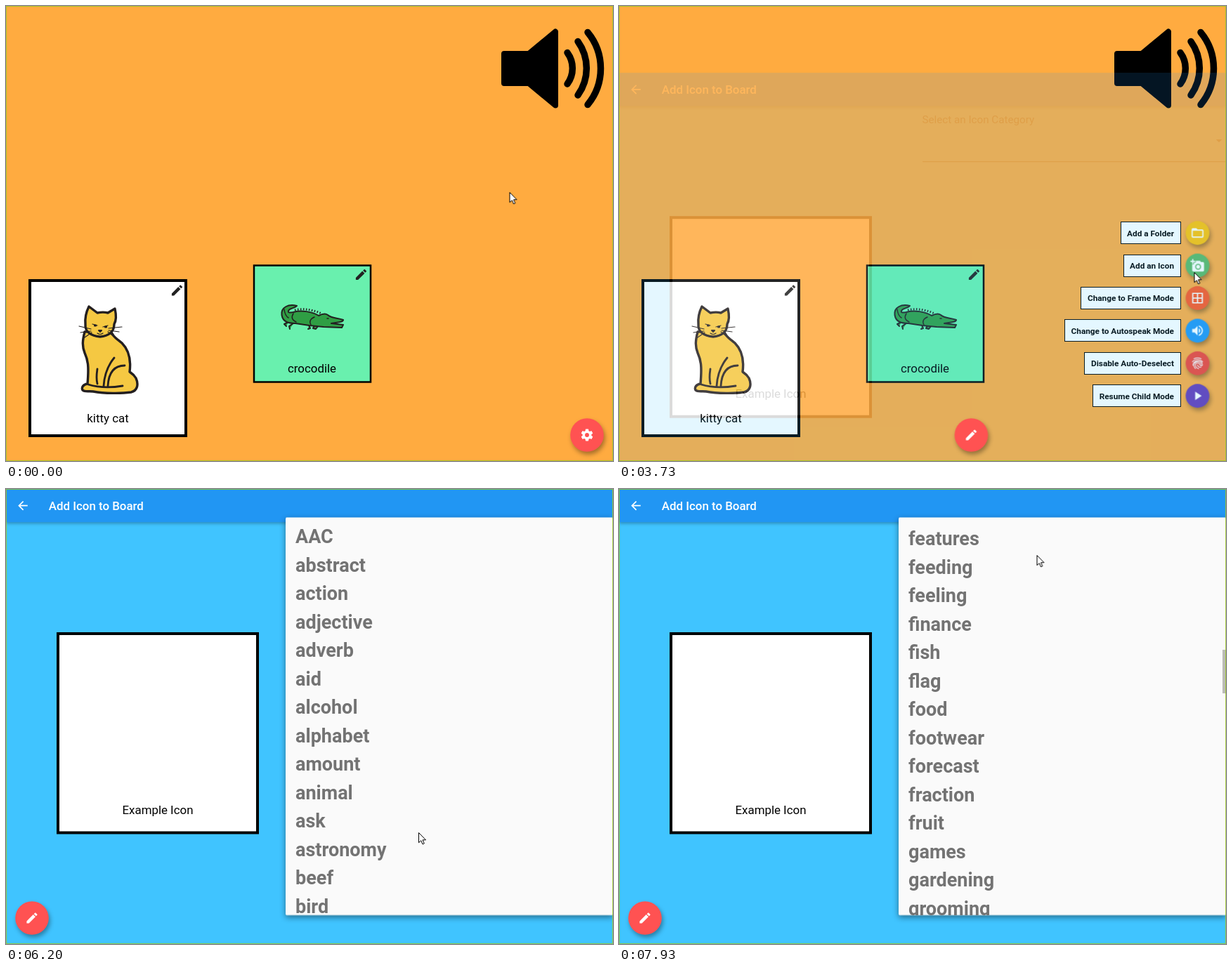
An HTML page for the animation above (8 s loop, 864 px wide and 648 px high).

```html
<!DOCTYPE html>
<html lang="en">
<head>
<meta charset="utf-8">
<title>Icon board</title>
<style>
html, body { margin: 0; width: 100%; height: 100%; overflow: hidden; background: #ffab40; }
svg { display: block; width: 864px; height: 648px; font-family: Roboto, sans-serif; font-size: 16.875px; }
.mid { text-anchor: middle; }
.label { font-size: 11.81px; font-weight: 700; text-anchor: end; }
.words { font-size: 27px; font-weight: 700; fill: #737373; }
.fab { filter: drop-shadow(2px 4px 3px rgba(0, 0, 0, .35)); }
.ink { fill: none; stroke: #231f20; stroke-linecap: round; stroke-linejoin: round; }

.cursor, .page, .hero, .gear, .press, .pick, .child, .tag, .sheet, .words, .scroll, .thumb, .bar {
  animation: 8s linear infinite both;
}
.cursor { animation-name: cursor; }
.page { animation-name: rise, fade; }
.hero { animation-name: hero, show; }
.gear { animation-name: leave; }
.press { animation-name: press; }
.pick { animation-name: pick; }
.child { animation-name: pop; }
.tag { animation-name: tag; }
.sheet { animation-name: unfold, sheet; }
.words { animation-name: words; }
.scroll { animation-name: scroll; }
.thumb { animation-name: thumb; }
.bar { animation-name: bar; }

@keyframes cursor {
  0%, 2.49% { transform: translate(716.5px, 265px); }
  2.5%, 5% { transform: translate(717.5px, 267px); animation-timing-function: ease-in-out; }
  15.83%, 23% { transform: translate(818px, 605.5px); animation-timing-function: ease-in; }
  29.17% { transform: translate(804px, 512px); }
  31.67% { transform: translate(798.5px, 487px); }
  34.17% { transform: translate(808.5px, 465px); animation-timing-function: ease-out; }
  40% { transform: translate(818.5px, 388px); }
  41.66%, 51.7% { transform: translate(818.5px, 379px); animation-timing-function: ease-in-out; }
  62.5%, 63.3% { transform: translate(583.5px, 116px); }
  63.33%, 70% { transform: translate(583px, 116px); animation-timing-function: ease-in-out; }
  77.5%, 78% { transform: translate(587px, 489px); animation-timing-function: ease-out; }
  80% { transform: translate(589px, 262px); }
  85% { transform: translate(590.5px, 234px); }
  99.12%, to { transform: translate(594.5px, 94px); }
}
@keyframes rise {
  0%, 45.48% { transform: translateY(162px); animation-timing-function: cubic-bezier(.4, 0, .2, 1); }
  49.23%, to { transform: none; }
}
@keyframes fade {
  0%, 45.48% { opacity: 0; animation-timing-function: ease-in; }
  49.23%, to { opacity: 1; }
}
@keyframes hero {
  0%, 45.48% { transform: translate(827px, 611px); animation-timing-function: cubic-bezier(.4, 0, .2, 1); }
  49.23%, to { transform: translate(37px, 611px); }
}
@keyframes show { 0%, 45.48% { opacity: 0; } 45.49%, to { opacity: 1; } }
@keyframes leave { 0%, 45.48% { opacity: 1; } 45.49%, to { opacity: 0; } }
@keyframes press {
  0%, 18.6% { transform: scale(.2); opacity: 0; }
  19.1% { transform: scale(.5); opacity: .25; }
  21.5% { transform: scale(1); opacity: .2; }
  24%, to { transform: scale(1); opacity: 0; }
}
@keyframes pick {
  0%, 42.8% { transform: scale(.2); opacity: 0; }
  43.3% { transform: scale(.5); opacity: .25; }
  45.5% { transform: scale(1); opacity: .2; }
  48%, to { transform: scale(1); opacity: 0; }
}
@keyframes pop { 0%, 20% { transform: scale(0); } 21.9%, to { transform: none; } }
@keyframes tag { 0%, 20% { opacity: 0; } 21.9%, to { opacity: 1; } }
@keyframes unfold {
  0%, 68.19% { transform: scaleY(.072); animation-timing-function: ease; }
  69.1%, to { transform: none; }
}
@keyframes sheet { 0%, 67.25% { opacity: 0; } 68.19%, to { opacity: 1; } }
@keyframes words { 0%, 69.1% { opacity: 0; } 69.7%, to { opacity: 1; } }
@keyframes scroll {
  0%, 78% { transform: none; animation-timing-function: cubic-bezier(.333, .467, .667, .772); }
  85% { transform: translateY(-971.5px); animation-timing-function: cubic-bezier(.333, .65, .667, .859); }
  99.12%, to { transform: translateY(-1698px); }
}
@keyframes thumb {
  0%, 78% { transform: translateY(43px); animation-timing-function: cubic-bezier(.333, .467, .667, .772); }
  85% { transform: translateY(149px); animation-timing-function: cubic-bezier(.333, .65, .667, .859); }
  99.12%, to { transform: translateY(229px); }
}
@keyframes bar { 0%, 78% { opacity: 0; } 80%, to { opacity: 1; } }
</style>
</head>
<body>
<svg viewBox="0 0 864 648">
  <defs>
    <path id="folder" d="M20 6h-8l-2-2H4c-1.1 0-2 .9-2 2v12c0 1.100.9 2 2 2h16c1.100 0 2-.9 2-2V8c0-1.100-.9-2-2-2zm0 12H4V8h16v10z"/>
    <path id="photo" d="M3 4V1h2v3h3v2H5v3H3V6H0V4h3zm3 6V7h3V4h7l1.830 2H21c1.100 0 2 .9 2 2v12c0 1.100-.9 2-2 2H5c-1.100 0-2-.9-2-2V10h3zm7 9c2.760 0 5-2.240 5-5s-2.240-5-5-5-5 2.240-5 5 2.240 5 5 5zm-3.200-5a3.200 3.200 0 0 0 6.400 0a3.200 3.200 0 0 0-6.400 0z"/>
    <path id="grid" d="M3 3v18h18V3H3zm8 16H5v-6h6v6zm0-8H5V5h6v6zm8 8h-6v-6h6v6zm0-8h-6V5h6v6z"/>
    <path id="volume" d="M3 9v6h4l5 5V4L7 9H3zm13.500 3c0-1.770-1.020-3.290-2.500-4.030v8.050c1.480-.73 2.500-2.250 2.500-4.020zM14 3.230v2.060c2.890.86 5 3.540 5 6.710s-2.110 5.850-5 6.710v2.060c4.010-.91 7-4.490 7-8.770s-2.990-7.860-7-8.770z"/>
    <path id="print" fill="none" stroke="#fff" stroke-width="1.200" stroke-linecap="round" d="M6 4.300C10 2.200 14 2.200 18 4.300M3.500 9.500C7.500 4 16.500 4 20.500 9.500M4.300 15.500C3 6 21 5 20.300 14.500C20 17 16.500 17 16 14.500C15.500 10.500 8.500 10.500 8.300 14.500C8.300 18 11 20.500 14 21.300M8.500 21C3 15 7 9 12 9.200C16 9.300 18.200 12 18.200 14.500M12 14.300C12 18 15 19 18 18.600"/>
    <path id="play" d="M8 5v14l11-7z"/>
    <path id="cog" d="M19.430 12.980c.04-.32.07-.64.07-.98s-.03-.66-.07-.98l2.110-1.650c.19-.15.24-.42.12-.64l-2-3.460c-.12-.22-.39-.3-.61-.22l-2.490 1c-.52-.4-1.080-.73-1.690-.98l-.38-2.650C14.460 2.180 14.250 2 14 2h-4c-.25 0-.46.18-.49.42l-.38 2.650c-.61.25-1.170.59-1.690.98l-2.490-1c-.23-.09-.49 0-.61.22l-2 3.460c-.13.22-.07.49.12.64l2.110 1.650c-.04.32-.07.65-.07.98s.03.66.07.98l-2.110 1.650c-.19.15-.24.42-.12.64l2 3.460c.12.22.39.3.61.22l2.490-1c.52.4 1.080.73 1.690.98l.38 2.650c.03.24.24.42.49.42h4c.25 0 .46-.18.49-.42l.38-2.650c.61-.25 1.170-.59 1.690-.98l2.490 1c.23.09.49 0 .61-.22l2-3.460c.12-.22.07-.49-.12-.64l-2.110-1.650zM12 15.500a3.500 3.500 0 1 1 0-7a3.500 3.500 0 0 1 0 7z"/>
    <path id="pencil" d="M3 17.250V21h3.750L17.810 9.940l-3.750-3.750L3 17.250zM20.710 7.040c.39-.39.39-1.020 0-1.410l-2.340-2.340c-.39-.39-1.020-.39-1.410 0l-1.830 1.830 3.750 3.750 1.830-1.830z"/>
    <path id="back" d="M20 11H7.830l5.590-5.590L12 4l-8 8 8 8 1.410-1.410L7.830 13H20v-2z"/>
    <path id="drop" d="M7 10l5 5 5-5z"/>
    <clipPath id="window"><path d="M398 40.500H864V607H398z"/></clipPath>
  </defs>

  <rect width="864" height="648" fill="#ffab40"/>

  <g stroke="#000" stroke-width="8" stroke-linejoin="round" stroke-linecap="round">
    <path d="M709 68H744L782 36.500V141.500L744 110H709Z"/>
    <path d="M799 66.500A37.500 37.500 0 0 1 799 111M814 50.500A65.500 65.500 0 0 1 814 127M828 37.500A81 81 0 0 1 828 140.500" fill="none" stroke-width="9.500"/>
  </g>

  <rect x="34" y="391" width="222" height="221" fill="#fff" stroke="#000" stroke-width="4"/>
  <text class="mid" x="145" y="593">kitty cat</text>
  <g class="ink" stroke-width="3.400">
    <path fill="#f5c842" d="M112 464C109 476 108 484 112 494C117 505 118 514 116 538C110 539 107 543 109 547C112 550 118 548 124 549C140 552 165 552 178 550C187 548 189 539 185 530C182 525 179 523 176 521C178 505 175 490 165 480C158 474 151 470 149 462Z"/>
    <path d="M117 539C130 543 148 544 166 541M130 538C128 530 129 524 130 517M154 501C145 512 140 524 139 541M169 512C153 512 146 524 145 541" stroke-width="2.800"/>
    <path fill="#f5c842" d="M113 453C112 441 115 434 118 428L130 437C135 436 141 436 145 437L155 431C157 440 157 448 154 453C154 464 146 470 134 471C121 470 112 464 113 453Z"/>
    <path d="M121 460L104 456M121 463L106 465M122 465L112 472M146 459L165 457M146 462L161 464M145 464L155 472M130 466Q134 469 138 466M123 453L130 455M138 457L145 455" stroke-width="1.200"/>
    <path fill="#231f20" d="M126 454.500h2v1h-2zM141 456.500h2v1h-2zM132 462h4l-2 2z" stroke-width="2"/>
  </g>

  <rect x="353" y="369.500" width="166" height="166" fill="#69f0ae" stroke="#000" stroke-width="2.500"/>
  <text class="mid" x="435.500" y="521.500">crocodile</text>
  <g class="ink" stroke-width="2">
    <path fill="#2f9e44" d="M402 450L396 453L399 456M409 452L403 456L404 460M431 454L433 459L430 460M439 455L437 459L441 460L445 455"/>
    <path fill="#2f9e44" d="M414 427C402 424 391 429 392.500 440C394 450 402 452 412 452L432 455L452 457L478 458L480 454L463 452C470 450 480 451 480 447C472 444 463 445 458 440C454 437 449 439 445 441C436 435 420 433 409 436C404 437 401 437 402 434C404 430 410 431 414 427Z"/>
    <path d="M411 433C424 430 438 433 449 438" stroke-width="3" stroke-dasharray="1.500 2.500" stroke-linecap="butt"/>
    <path d="M409 438Q404 446 413 450M439 443Q430 447 434 454M396 432Q397 441 402 444M457 445h2" stroke-width="1.500"/>
  </g>
  <g id="pens"></g>

  <g id="dial"></g>
  <g class="gear">
    <g transform="translate(827 611)">
      <circle class="fab" r="23.800" fill="#ff5252"/>
      <g id="gear"></g>
      <circle class="press" r="23.800" fill="#fff"/>
    </g>
  </g>

  <g class="page">
    <rect width="864" height="648" fill="#40c4ff"/>
    <rect width="864" height="47.250" fill="#2196f3" style="filter:drop-shadow(0 2px 2px rgba(0,0,0,.28))"/>
    <text x="60.800" y="30" fill="#fff" font-weight="500">Add Icon to Board</text>
    <text x="431.500" y="71.500" font-size="15.190" fill-opacity=".54">Select an Icon Category</text>
    <path d="M432 126.500H864" stroke="#000" stroke-opacity=".6"/>
    <rect x="74" y="206" width="284" height="283.500" fill="#fff" stroke="#000" stroke-width="4"/>
    <text class="mid" x="216" y="463">Example Icon</text>
    <g id="tools"></g>
  </g>
  <g class="hero">
    <circle class="fab" r="23.800" fill="#ff5252"/>
    <g id="edit"></g>
  </g>

  <g transform="translate(398 40.500)">
    <rect class="sheet" width="466" height="566.500" rx="1.700" fill="#fafafa" style="filter:drop-shadow(0 3px 4px rgba(0,0,0,.45))"/>
  </g>
  <g clip-path="url(#window)">
    <g class="words"><g class="scroll" id="list"></g></g>
    <g class="bar"><rect class="thumb" x="859" width="5" height="62" fill="#bcbcb8"/></g>
  </g>

  <rect x=".5" y=".5" width="863" height="647" fill="none" stroke="#9ac820" stroke-opacity=".8"/>
  <g class="cursor">
    <path d="M.5.5V14.700L3.800 11.700L6 16.900L8.300 15.900L6.100 10.800H10.500Z" fill="#fff" stroke="#000"/>
  </g>
</svg>
<script>
const SCALE = 0.84375, LOOP = 8000, STEP = 1000 / 15;
const fill = (id, html) => { document.getElementById(id).innerHTML = html; };
const icon = (name, x, y, color) =>
  `<use href="#${name}" fill="${color}" transform="translate(${x} ${y}) scale(${SCALE}) translate(-12 -12)"/>`;

fill('pens', icon('pencil', 243.5, 405, '#222') + icon('pencil', 505.5, 382.5, '#222'));
fill('gear', icon('cog', 0, 0, '#fff'));
fill('edit', icon('pencil', 0, 0, '#fff'));
fill('tools', icon('back', 24, 23.7, '#fff') + icon('drop', 854, 96.5, 'rgba(0,0,0,.54)'));

const actions = [
  ['Add a Folder', 'folder', '#ffc107', 714],
  ['Add an Icon', 'photo', '#4caf50', 718],
  ['Change to Frame Mode', 'grid', '#ff5722', 657],
  ['Change to Autospeak Mode', 'volume', '#2196f3', 634],
  ['Disable Auto-Deselect', 'print', '#f44336', 662],
  ['Resume Child Mode', 'play', '#673ab7', 674],
];
fill('dial', actions.map(([text, name, color, left], i) => {
  const y = 323.2 + i * 46.4;
  const delay = `style="animation-delay:${(5 - i) * 28}ms"`;
  return `<g class="tag" ${delay}>
      <rect x="${left + .5}" y="${Math.round(y) - 15.5}" width="${799 - left}" height="31" fill="#fff" stroke="#000"/>
      <text class="label" x="790" y="${y + 4.3}">${text}</text>
    </g>
    <g transform="translate(823.5 ${y})"><g class="child" ${delay}>
      <circle class="fab" r="16.900" fill="${color}"/>${icon(name, 0, 0, '#fff')}
      ${name === 'photo' ? '<circle class="pick" r="16.900" fill="#fff"/>' : ''}
    </g></g>`;
}).join(''));

const words = `AAC abstract action adjective adverb aid alcohol alphabet amount animal ask astronomy beef bird
  birthday body bread breakfast building cake camping category clothes colour
  communication computer cooking country dairy dessert diary direction DIY drink Easter electric emotion equipment
  event exercise family farm features feeding feeling finance fish flag food footwear forecast fraction fruit
  games gardening grooming hair health`.split(/\s+/);
fill('list', words.map((word, i) => `<text x="412" y="${77 + i * 40.5}">${word}</text>`).join(''));

const motions = document.getAnimations();
motions.forEach(m => m.pause());
let start;
function draw(now) {
  start ??= now;
  const time = (now - start) % LOOP;
  const step = Math.floor((time + 4) / STEP) * STEP % LOOP;
  motions.forEach(m => { m.currentTime = step; });
  requestAnimationFrame(draw);
}
requestAnimationFrame(draw);
</script>
</body>
</html>
```
